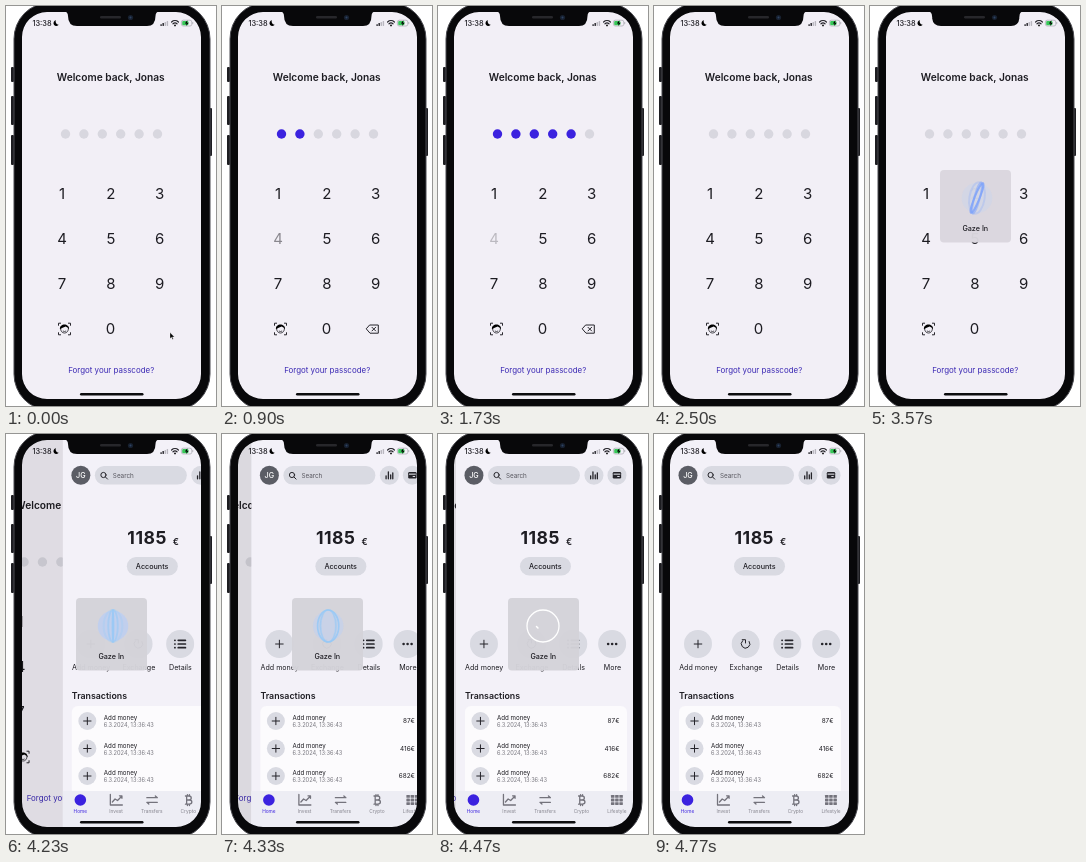
Animation of 210 by 400 pixels, one loop 6870 ms. Source, as an HTML page:

```html
<!DOCTYPE html>
<html lang="en">
<head>
<meta charset="utf-8">
<title>Passcode login</title>
<style>
html, body { margin: 0; width: 100%; height: 100%; overflow: hidden; background: #fff; }
svg { display: block; width: 100%; height: 100%; }
text { font-family: Inter, "Liberation Sans", sans-serif; }
.line { fill: none; stroke: #25242a; stroke-width: 1; stroke-linecap: round; stroke-linejoin: round; }
.soft { fill: #d9dae2; }
.tab .line { stroke: #74737c; stroke-width: 1.3; }
.balance { letter-spacing: .5px; }
</style>
</head>
<body>
<svg id="stage" viewBox="0 0 210 400"></svg>
<script>
const LOOP = 6870;
const BLUE = '#3b22df';
const PRESSES = [510, 800, 1090, 1380, 1690, 1960];
const CLEAR = 2450;
const WIDTH = 179;
const PUSH = [[4075, 0], [4100, .056], [4140, .28], [4180, .53], [4230, .77],
  [4300, .9], [4370, .957], [4470, .989], [4560, 1]];

const clamp = x => Math.max(0, Math.min(1, x));
const ramp = (t, a, b) => clamp((t - a) / (b - a));
const lerp = (points, t) => {
  if (t <= points[0][0]) return points[0][1];
  for (let i = 1; i < points.length; i++) {
    const [t0, v0] = points[i - 1], [t1, v1] = points[i];
    if (t < t1) return v0 + (v1 - v0) * (t - t0) / (t1 - t0);
  }
  return points[points.length - 1][1];
};

const text = (x, y, size, str, { weight = 400, anchor = 'start', color = '#1d1c22', attrs = '' } = {}) =>
  `<text x="${x}" y="${y}" font-size="${size}" font-weight="${weight}" text-anchor="${anchor}" fill="${color}" ${attrs}>${str}</text>`;
const circle = (x, y, r, attrs = 'class="soft"') => `<circle cx="${x}" cy="${y}" r="${r}" ${attrs}/>`;
const rect = (x, y, w, h, r, attrs = 'class="soft"') =>
  `<rect x="${x}" y="${y}" width="${w}" height="${h}" rx="${r}" ${attrs}/>`;
const line = (d, style = '') => `<path class="line" d="${d}" style="${style}"/>`;
const plus = (x, y, s) => line(`M${x - s} ${y}h${2 * s}M${x} ${y - s}v${2 * s}`);
const fill = color => `fill="${color}"`;
const mid = { anchor: 'middle' };

function keypad() {
  const dots = PRESSES.map((_, i) => circle(59.5 + 18.4 * i, 128, 4.7, 'class="dot"')).join('');
  const keys = [1, 2, 3, 4, 5, 6, 7, 8, 9].map((n, i) =>
    text([56, 104.9, 153.7][i % 3], 192.6 + 45.3 * Math.floor(i / 3), 15, n, { ...mid, attrs: `id="key${n}"` })).join('');
  const face = `<g transform="translate(58.5 323)">
    ${line('M-6 -3.7v-2.1h2.1M6 -3.7v-2.1h-2.1M-6 3.7v2.1h2.1M6 3.7v2.1h-2.1')}
    ${line('M-4 -.8C-4.3 5.8 4.3 5.8 4 -.8M-1.3 2.2q1.3 .9 2.6 0', 'stroke-width:.8')}
    <path d="M-4.6 .2C-5 -6 4.800 -6 4.600 .2Q3.600 -1.600 1.200 -2.600Q-2 -1.300 -4.600 .2Z"/></g>`;
  return rect(16, 0, WIDTH + 60, 400, 0, fill('#f2eff6')) +
    text(50.8, 75, 10.2, 'Welcome back, Jonas', { weight: 600 }) +
    `<g id="dots">${dots}</g>${keys}` + text(104.4, 328.4, 15, '0', mid) + face +
    `<g id="erase">${line('M148 319h8.3v8.2h-8.3l-3.5 -4.1zM150 321.3l3.6 3.6M153.6 321.3l-3.6 3.6')}</g>` +
    text(105.2, 367, 7.95, 'Forgot your passcode?', { ...mid, color: '#3c2ab4' });
}

function actions() {
  const items = [[44, 'Add money'], [91.7, 'Exchange'], [133.3, 'Details'], [172.2, 'More']];
  return items.map(([x, label]) => circle(x, 210, 14) + text(x + .3, 236, 7.1, label, mid)).join('') +
    plus(44, 210, 3.8) +
    line('M88.6 206.7a4.300 4.300 0 1 0 6.600 .8M88.200 205.700h3.300v3.300') +
    [206.3, 210, 213.7].map(y => line(`M131.4 ${y}h7.2M128 ${y}h.2`, 'stroke-width:1.7')).join('') +
    [168.2, 172.2, 176.2].map(x => circle(x, 210, 1.3, fill('#25242a'))).join('');
}

function transactions() {
  const rows = ['87€', '416€', '682€'].map((sum, i) => {
    const y = 287 + 27.5 * i;
    return circle(40.5, y, 9) + plus(40.5, y, 3.7) + text(57, y - 1, 6.2, 'Add money') +
      text(57, y + 6, 5.65, '6.3.2024, 13:36:43', { color: '#77767e' }) +
      text(179.5, y + 2.3, 6.4, sum, { anchor: 'end' });
  }).join('');
  return text(25, 265, 8.8, 'Transactions', { weight: 600 }) +
    rect(25, 272, 162, 96, 6, fill('#fcfbfd')) + rows;
}

function tabs() {
  const labels = [[33.5, 'Home'], [69.2, 'Invest'], [105, 'Transfers'], [141.5, 'Crypto'], [177, 'Lifestyle']];
  let grid = '';
  for (let i = 0; i < 9; i++) {
    grid += rect(171 + 4.2 * (i % 3), 361 + 3.6 * Math.floor(i / 3), 3.5, 2.8, .4, fill('#74737c'));
  }
  return rect(16, 357, WIDTH, 40, 0, fill('#ededf4')) +
    labels.map(([x, s], i) => text(x, 379, 4.8, s, { ...mid, color: i ? '#85848d' : BLUE })).join('') +
    circle(33.5, 366, 5.8, fill(BLUE)) +
    `<g class="tab">
    ${line('M63.5 360.500v10.500h12M65.500 368l2.700 -3l2.500 1.500l4.200 -4.300M72.600 361.800h2.500v2.500')}
    ${line('M100 363.700h10.500l-2 -1.800M110.500 368.300h-10.500l2 1.800')}
    ${line('M138.600 362h3.400q2.400 0 2.400 2t-2.400 2h-2.200h2.600q2.600 0 2.600 2.100t-2.600 2.100h-3.800M139.800 362v8.200M140.600 360.600v1.400M142.600 360.600v1.400M140.600 370.200v1.400M142.600 370.200v1.400')}
    </g>` + grid;
}

function home() {
  return rect(16, 0, WIDTH, 400, 0, fill('#f3f1f8')) +
    circle(34, 41.2, 9.5, fill('#5b5d65')) + text(34, 43.9, 7.2, 'JG', { ...mid, weight: 500, color: '#fff' }) +
    rect(48, 32, 92, 18.6, 9.3) + circle(56.6, 41, 2.6, 'class="line"') + line('M58.6 43l2.1 2.1') +
    text(66, 43.8, 6.3, 'Search', { color: '#55545c' }) +
    circle(154, 41.2, 9.5) + circle(177, 41.2, 9.5) +
    line('M150.7 44.800v-3M153 44.800v-7M155.300 44.800v-4M157.400 44.800v-6', 'stroke-width:1.3') +
    rect(172.8, 38, 8.4, 6.4, 1.2, fill('#25242a')) + rect(173.6, 39.6, 6.8, 1.1, 0) + rect(177.3, 42, 2.4, 1, 0) +
    text(100.3, 109.7, 17.6, '1185', { ...mid, weight: 700, attrs: 'class="balance"' }) +
    text(126, 111, 9, '€', { weight: 600 }) +
    rect(80, 123, 51, 18.5, 9.2) + text(105.3, 134.9, 7.2, 'Accounts', { ...mid, weight: 500 }) +
    actions() + transactions() + tabs();
}

function prompt() {
  return rect(70, 164, 71, 72.5, 4, 'id="panel"') +
    circle(106, 192, 15.3, 'id="disc" fill="#b4cdfb"') +
    [0, 1, 2].map(() => '<ellipse class="loop" cy="192" ry="16" fill="none"/>').join('') +
    '<path id="tick" class="line" d="M98.5 192.5l4.8 5l9.4 -10.4" pathLength="1" stroke-dasharray="1 2" style="stroke:#fff;stroke-width:1.5"/>' +
    text(105.3, 225, 7.2, 'Gaze In', { ...mid, weight: 500 });
}

function status() {
  return text(26.4, 20, 7.4, '13:38', { weight: 500 }) +
    '<path d="M50 14.300a2.900 2.900 0 1 0 2.900 4.300a2.900 2.900 0 0 1 -2.900 -4.300z"/>' +
    [0, 1, 2, 3].map(i => rect(154.4 + 2.1 * i, 18.2 - i * 1.1, 1.4, 1.8 + i * 1.1, .4,
      fill(i < 2 ? '#1d1c22' : '#b9b7bf'))).join('') +
    line('M165.6 16a5 5 0 0 1 6.8 0M167 17.8a3 3 0 0 1 4 0', 'stroke-width:1.2') + circle(169, 19.4, .9, '') +
    rect(175.4, 14.2, 10.4, 5.8, 1.8, 'fill="none" stroke="#aaa8b0" stroke-width=".7"') +
    rect(176.2, 15, 6.2, 4.2, 1, fill('#38c759')) +
    '<path d="M181.4 14.200l-2.600 3.200h1.800l-.6 2.600l2.700 -3.300h-1.800z"/>' + rect(186.4, 16, .8, 2.2, .4, fill('#aaa8b0'));
}

function phone() {
  const body = 'M43 -3H169A35 36 0 0 1 204 33V368A35 36 0 0 1 169 404H43A35 36 0 0 1 8 368V33A35 36 0 0 1 43 -3Z';
  const hole = 'M41 6H170A25 25 0 0 1 195 31V368A25 25 0 0 1 170 393H41A25 25 0 0 1 16 368V31A25 25 0 0 1 41 6Z';
  return [[61, 15], [90, 29], [129, 30]].map(([y, h]) => rect(5, y, 3, h, 1, fill('#1d1d21'))).join('') +
    rect(203.5, 102, 2.5, 48, 1, fill('#1d1d21')) +
    `<path d="${body}${hole}" fill="#08080a" fill-rule="evenodd"/>` +
    `<path d="${body}" fill="none" stroke="#4a4a50"/>` +
    '<path d="M58 5Q62 6 62 10Q62 20 71 20H141Q149.500 20 149.500 10Q149.500 6 153.500 5Z" fill="#08080a"/>' +
    rect(94, 10, 21, 2.4, 1.2, fill('#27272b')) + circle(124.5, 11.5, 2.6, fill('#17202f')) +
    circle(124.5, 11.5, 1, fill('#2d4263')) + rect(74, 387, 63.5, 2.4, 1.2, fill('#0c0c0e'));
}

const stage = document.getElementById('stage');
stage.innerHTML = `<clipPath id="screen">${rect(15, 5, 181, 389, 25, '')}</clipPath>
  <g clip-path="url(#screen)">
    <g id="login">${keypad()}</g>
    ${rect(16, 0, WIDTH, 400, 0, 'id="shade"')}
    <g id="home">${home()}</g>
    <g id="prompt">${prompt()}</g>
    ${status()}
  </g>${phone()}
  <path id="cursor" d="M164 326.500v6l1.500 -1.300l1 2.200l.9 -.4l-1 -2.100h2z" stroke="#fff" stroke-width=".3"/>`;

const $ = id => document.getElementById(id);
const set = (el, attrs) => { for (const k in attrs) el.setAttribute(k, attrs[k]); };
const dots = stage.querySelectorAll('.dot');
const loops = stage.querySelectorAll('.loop');

function drawEntry(t) {
  dots.forEach((dot, i) => set(dot, { fill: t >= PRESSES[i] && t < CLEAR ? BLUE : '#d8d7df' }));
  const s = ramp(t, 2070, CLEAR);
  set($('dots'), { transform: `translate(${-8 * Math.sin(s * Math.PI * 6) * (1 - s * .4)} 0)` });
  const dim = Math.max(...PRESSES.map(p => ramp(t, p - 10, p + 30) * (1 - ramp(t, p + 60, p + 190))));
  set($('key4'), { opacity: 1 - .75 * dim });
  set($('erase'), { opacity: t >= PRESSES[0] && t < CLEAR ? 1 : 0 });
}

function drawPrompt(t) {
  set($('prompt'), { opacity: ramp(t, 3430, 3560) * (1 - ramp(t, 4590, 4760)) });
  set($('panel'), { fill: t < 4150 ? '#dad7de' : '#d4d3d9', opacity: .97 });
  const done = ramp(t, 4250, 4450);
  const cx = 107 - 2 * done;
  set($('disc'), { cx, opacity: .6 * (1 - done) * ramp(t, 3500, 3700) });
  const tilt = 22 * (1 - ramp(t, 4100, 4230));
  loops.forEach((loop, i) => {
    const swing = 15 * Math.abs(Math.cos((t - 4100) / 220 + 1 - .35 * i));
    set(loop, {
      cx,
      rx: swing + (16 - swing) * done,
      transform: `rotate(${tilt * (1 - .3 * i)} ${cx} 192)`,
      stroke: done > .6 ? '#fff' : t < 4170 ? '#7da2fb' : '#94c8f8',
      'stroke-width': 2 - .7 * done,
      opacity: done > .6 ? (i ? 0 : 1) : .8 - .27 * i
    });
  });
  const tick = ramp(t, 4460, 4570);
  set($('tick'), { opacity: tick > 0 ? 1 : 0, 'stroke-dashoffset': 1 - tick });
}

function draw(t) {
  const p = lerp(PUSH, t);
  set($('cursor'), { opacity: t < 30 ? 1 : 0 });
  set($('login'), { transform: `translate(${-.3 * WIDTH * p} 0)` });
  set($('shade'), { opacity: .1 * p });
  set($('home'), { transform: `translate(${WIDTH * (1 - p)} 0)`, visibility: p > 0 ? 'visible' : 'hidden' });
  drawEntry(t);
  drawPrompt(t);
}

const start = performance.now();
function tick() {
  draw((performance.now() - start) % LOOP);
  requestAnimationFrame(tick);
}
tick();
</script>
</body>
</html>
```
